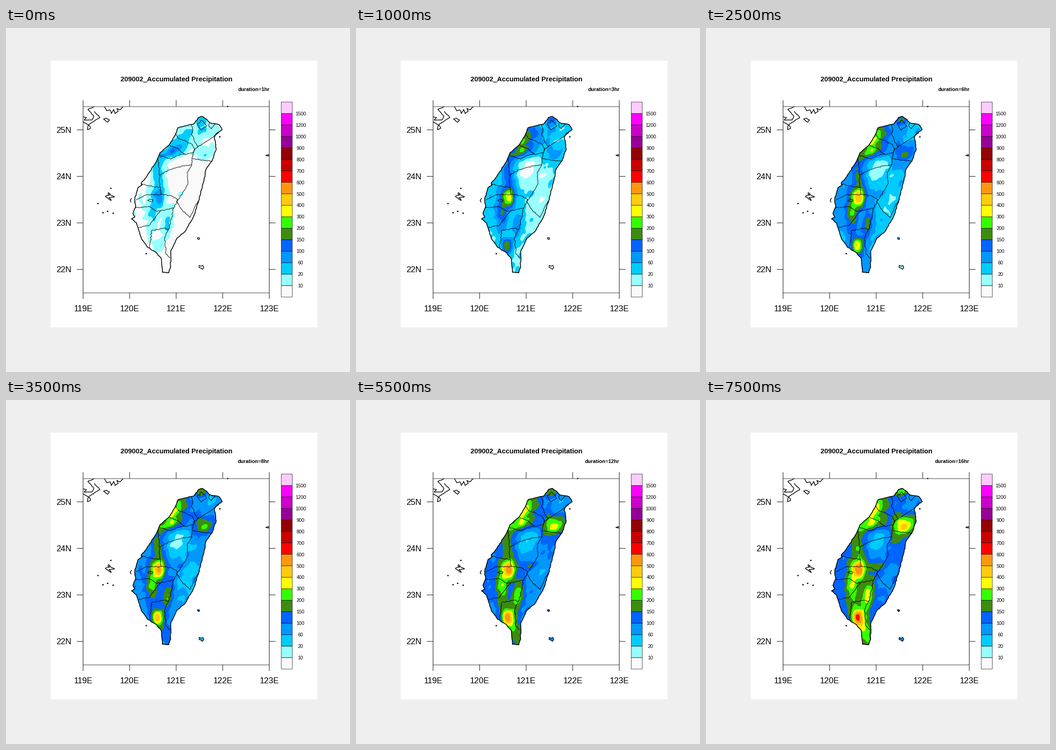
A matplotlib script that plays this animation: 748x748 px, repeating every 8000 ms.

```python
import numpy as np
import matplotlib.pyplot as plt
from matplotlib.animation import FuncAnimation
from matplotlib.patches import Polygon, Rectangle

SIZE, DPI = 748, 100
HOURS, STEP_MS = 16, 500
PT = 72 / DPI

COLORS = ["#fafafa", "#98ffff", "#00cbff", "#0097ff", "#0065ff", "#3c8c10",
          "#33ff00", "#ffff00", "#ffcb0c", "#ff960f", "#ff0000", "#c80000",
          "#970000", "#970097", "#cb00cb", "#ff00ff", "#ffcbff"]
LEVELS = [10, 20, 60, 100, 150, *range(200, 1100, 100), 1200, 1500]

COAST = [
    (427, 192), (437, 199), (443, 206), (463, 210), (470, 221), (457, 230),
    (453, 238), (457, 262), (448, 289), (436, 305), (433, 318), (428, 340),
    (419, 376), (407, 412), (388, 444), (371, 458), (358, 487), (358, 520),
    (354, 532), (340, 531), (337, 500), (325, 487), (308, 477), (294, 457),
    (284, 424), (273, 415), (280, 411), (276, 403), (282, 389), (280, 372),
    (287, 347), (296, 341), (294, 337), (306, 323), (320, 301), (331, 281),
    (335, 271), (354, 255), (366, 236), (374, 217), (408, 209), (418, 195)]

BORDERS = [
    # north
    [(425, 200), (432, 206), (436, 213), (424, 222), (416, 210), (425, 200)],
    [(443, 206), (441, 213), (447, 219), (455, 209)],
    [(403, 211), (406, 222), (403, 231), (418, 259)],
    [(463, 227), (446, 240), (426, 253), (409, 264), (404, 284), (447, 290)],
    [(369, 229), (375, 240), (405, 253), (411, 265)],
    [(356, 255), (374, 262), (388, 275)],
    [(334, 277), (358, 285), (376, 277), (404, 272), (411, 265)],
    # centre
    [(334, 320), (352, 309), (372, 303), (404, 297), (405, 285)],
    [(404, 297), (394, 316), (396, 338), (383, 362), (370, 378)],
    [(331, 281), (334, 320), (333, 332), (337, 362)],
    [(293, 339), (318, 345), (335, 346)],
    [(283, 374), (305, 363), (337, 362), (356, 364), (374, 374)],
    [(308, 375), (313, 372), (320, 374), (318, 378), (308, 375)],
    # south
    [(281, 391), (311, 388), (328, 399), (364, 392), (374, 374)],
    [(336, 397), (325, 413), (310, 430), (288, 434)],
    [(364, 392), (360, 414), (354, 437)],
    [(312, 478), (317, 440), (340, 436), (354, 437), (345, 457), (348, 492),
     (357, 500)],
    [(370, 378), (384, 397), (400, 412), (410, 390), (419, 376)],
]
SHORES = [
    # mainland corner
    [(168, 193), (175, 195), (170, 200), (187, 200), (191, 192), (178, 177),
     (194, 170)],
    [(192, 181), (204, 195), (187, 205), (180, 211), (184, 218), (177, 221),
     (179, 211), (168, 204)],
    [(214, 170), (219, 180), (226, 178), (229, 186), (234, 177), (237, 186),
     (244, 181), (241, 175), (248, 178), (255, 171)],
    [(212, 198), (218, 196), (225, 200), (221, 205), (212, 198)],
    # small islands
    [(216, 366), (226, 362), (236, 367), (224, 369), (229, 375), (216, 366)],
    [(222, 358), (226, 360), (224, 364), (222, 358)],
    [(273, 370), (270, 375), (272, 379)],
    [(573, 275), (565, 277), (573, 278)],
]
DOTS = [(228, 349), (200, 382), (211, 402), (221, 399), (233, 403),
        (305, 491), (465, 237), (482, 171)]

# Rain cells: centre, radii, tilt in degrees, and strength in colour bands
# above the general level after 1, 4 and 16 hours.
CELLS = [
    (385, 245, 60, 22, -42, 1.9, 1.6, 0.6),
    (366, 240, 34, 12, -56, 0.2, 3.7, 2.9),
    (363, 268, 24, 10, -25, 2.2, 2.2, 2.1),
    (425, 200, 14, 12, 0, 1.4, 1.6, 1.8),
    (442, 222, 30, 20, 0, 0.6, -0.2, -1.1),
    (429, 273, 24, 19, -30, 1.2, 1.5, 4.0),
    (372, 308, 34, 27, -30, -0.7, -1.6, -1.8),
    (333, 330, 62, 14, 90, 2.4, 2.8, 2.0),
    (332, 369, 17, 13, 90, 1.4, 4.1, 4.2),
    (317, 402, 38, 12, 92, 1.4, 2.7, 2.5),
    (292, 375, 60, 25, 90, 0.4, 0.9, 0.2),
    (352, 425, 34, 13, 100, 1.5, 1.7, 3.0),
    (328, 474, 18, 10, 92, 1.1, 5.0, 4.2),
    (341, 490, 45, 14, 72, 0.0, -0.2, 3.0),
    (398, 385, 50, 28, 110, -0.3, -1.0, -0.7),
    (370, 362, 22, 10, -15, 0.5, 0.4, 1.5),
    (410, 315, 28, 12, 105, -0.2, -0.3, 1.2),
]
GROWTH = 0.95  # colour bands gained by the whole map per doubling of time

rng = np.random.default_rng(7)
GX, GY = np.meshgrid(np.arange(268, 474, 1.5), np.arange(188, 538, 1.5))


def bump(x, y, rx, ry, tilt):
    a = np.radians(tilt)
    dx, dy = GX - x, GY - y
    u = (dx * np.cos(a) + dy * np.sin(a)) / rx
    v = (dy * np.cos(a) - dx * np.sin(a)) / ry
    return np.exp(-u * u - v * v)


def ripple(waves=14, amp=0.08):
    """Small uneven terrain effect from random plane waves."""
    total = np.zeros_like(GX)
    for _ in range(waves):
        a, phase = rng.uniform(0, 2 * np.pi, 2)
        k = 2 * np.pi / rng.uniform(14, 40)
        total += amp * np.sin(k * (GX * np.cos(a) + GY * np.sin(a)) + phase)
    return total


BUMPS = [(bump(*cell[:5]), cell[5:]) for cell in CELLS]
TERRAIN = ripple()


def rainfall(hour):
    t = np.log2(hour)
    field = GROWTH * t + TERRAIN
    for shape, strength in BUMPS:
        field = field + shape * np.interp(t, (0, 2, 4), strength)
    return field


def rough(points, amp=1.0, step=3):
    """Subdivide a polyline and shake its inner points a little."""
    p = np.array(points, float)
    out = [p[0]]
    for a, b in zip(p[:-1], p[1:]):
        n = max(1, int(np.hypot(*(b - a)) / step))
        for k in range(1, n + 1):
            shake = rng.uniform(-amp, amp, 2) if k < n else 0
            out.append(a + (b - a) * k / n + shake)
    return np.array(out)


fig = plt.figure(figsize=(SIZE / DPI, SIZE / DPI), dpi=DPI, facecolor="#efefef")
ax = fig.add_axes([0, 0, 1, 1])
ax.set(xlim=(0, SIZE), ylim=(SIZE, 0))
ax.axis("off")
ax.add_patch(Rectangle((97, 71), 580, 580, fc="white", ec="none", zorder=0))
box = Rectangle((168, 171), 404, 404, fc="none", ec="none")
ax.add_patch(box)


def line(points, width=1.0, color="black", z=4, clip=None):
    xs, ys = zip(*points)
    art, = ax.plot(xs, ys, color=color, lw=width * PT, zorder=z, snap=False,
                   solid_joinstyle="round", solid_capstyle="butt")
    if clip:
        art.set_clip_path(clip)


def label(x, y, text, px, **kw):
    return ax.text(x, y, text, fontsize=px * PT, family="Liberation Sans",
                   va="baseline", **kw)


# Map frame, ticks and degree labels
for y in (171, 576):
    line([(168, y), (572, y)], color="#333333", z=5)
for i in range(5):
    x = 167.6 + 101.2 * i
    if i in (0, 4):
        line([(x, 157), (x, 589)], z=5)
    else:
        line([(x, 157), (x, 171)])
        line([(x, 575), (x, 589)])
    label(x, 616, f"{119 + i}E", 18, ha="center")
for i in range(4):
    y = 221.5 + 101.15 * i
    for x in (154, 572):
        line([(x, y), (x + 14, y)])
    label(142.5, y + 6.3, f"{25 - i}N", 18, ha="right")

# Colour bar
CELL = 424 / len(COLORS)
for i, color in enumerate(COLORS):
    ax.add_patch(Rectangle((598.5, 585 - CELL * (i + 1)), 24, CELL, fc=color,
                           ec="black", lw=0.7 * PT, snap=False))
for i, level in enumerate(LEVELS):
    label(640.5, 585 - CELL * (i + 1) + 4, str(level), 10.6, ha="center")

label(370.3, 116, "209002_Accumulated Precipitation", 14.7, weight="bold",
      ha="center")
duration = label(573, 136.5, "", 11.1, weight="bold", ha="right")

# Land
coast = rough(COAST + COAST[:1], 0.8, 4)
land = Polygon(coast, fc=COLORS[0], ec="none", zorder=1)
ax.add_patch(land)
line(coast, 1.7, z=5)
for border in BORDERS:
    line(rough(border, 1.3))
for shore in SHORES:
    line(rough(shore, 0.7), 1.5, clip=box)
for x, y in DOTS:
    line([(x - 1.5, y), (x + 1.5, y - 0.5)], 2.5)

# Offshore islands: outline, doubling at which rain starts, bands per doubling
OFFSHORE = [
    ([(416, 456), (420, 456), (421, 459), (418, 460)], 1.8, 2.4),
    ([(420, 516), (424, 518), (428, 516), (430, 521), (427, 525), (424, 522),
      (420, 521)], 2, 1.7),
]
isles = []
for shape, start, rate in OFFSHORE:
    patch = Polygon(shape, ec="black", lw=1.4 * PT, zorder=4)
    ax.add_patch(patch)
    isles.append((patch, start, rate))

EDGES = [-50] + [k + .5 for k in range(10)] + [50]
rain = []


def update(i):
    hour = i + 1
    while rain:
        rain.pop().remove()
    layer = ax.contourf(GX, GY, rainfall(hour), levels=EDGES,
                        colors=COLORS[:11], zorder=2)
    layer.set_clip_path(land)
    rain.append(layer)
    for patch, start, rate in isles:
        band = max(0, rate * (np.log2(hour) - start))
        patch.set_facecolor(COLORS[int(round(band))])
    duration.set_text(f"duration={hour}hr")
    ax.set(xlim=(0, SIZE), ylim=(SIZE, 0))
    return [layer, duration]


anim = FuncAnimation(fig, update, frames=HOURS, interval=STEP_MS, repeat=True,
                     repeat_delay=0, init_func=lambda: [])
plt.show()
```
